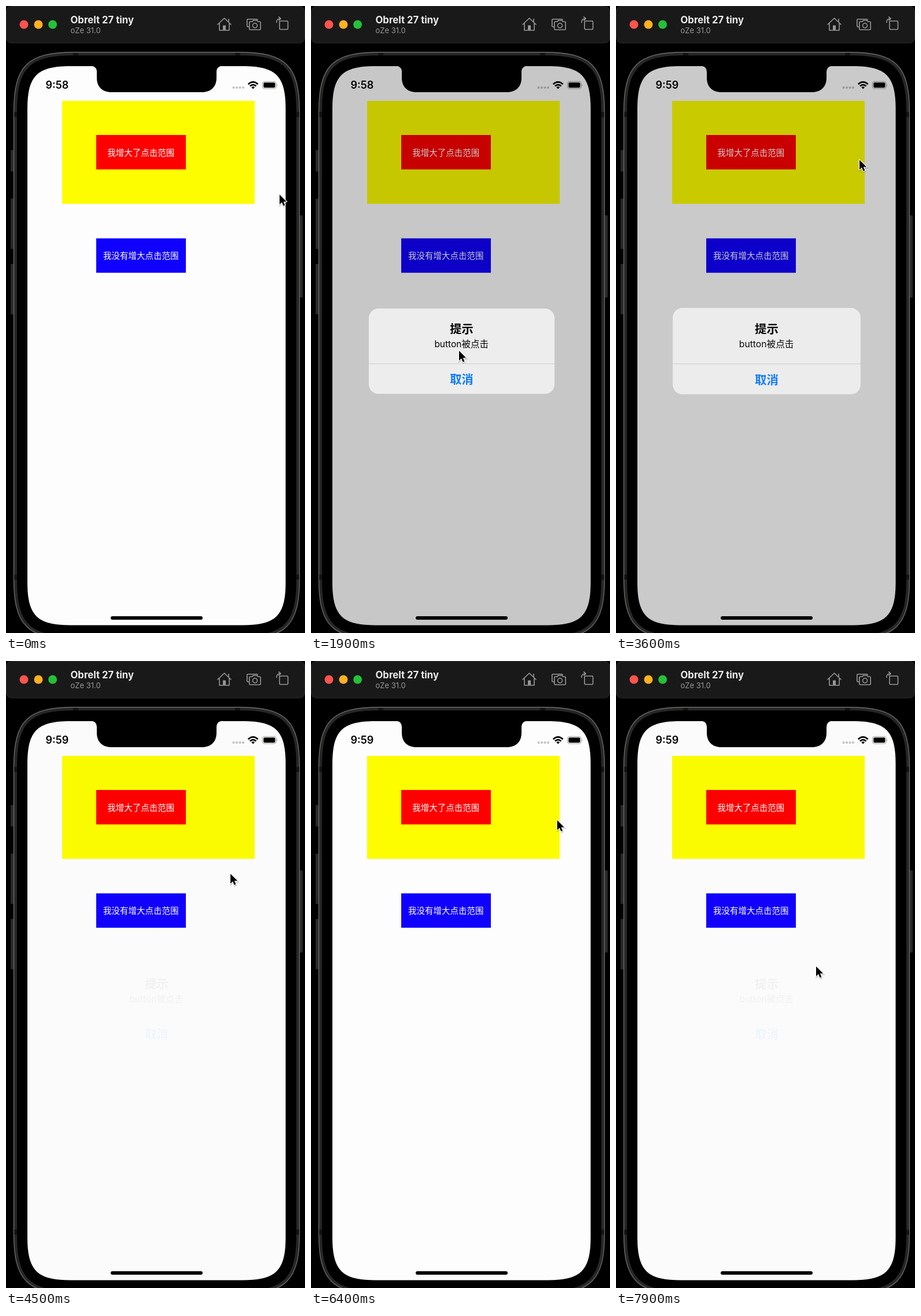
An HTML page for the animation above (8 s loop, 517x1084 px).

```html
<!DOCTYPE html>
<html lang="zh">
<head>
<meta charset="utf-8">
<style>
  html, body { margin: 0; width: 100%; height: 100%; overflow: hidden; background: #000; }
  svg { display: block; width: 517px; height: 1084px; }
  text { font-family: Inter, "Noto Sans CJK SC", "Noto Sans CJK", sans-serif; }
  .mid { text-anchor: middle; }
  .label { font-size: 14.5px; font-weight: 300; fill: #fff; }
  .icon { fill: none; stroke: #989898; stroke-width: 1.6; stroke-linejoin: round; stroke-linecap: round; }
</style>
</head>
<body>
<svg viewBox="0 0 517 1084">
  <rect width="517" height="1084"/>

  <!-- toolbar -->
  <rect x=".5" y=".5" width="516" height="63.5" rx="9" fill="#191919" stroke="#2b2b25"/>
  <circle cx="31" cy="32" r="7.5" fill="#ff544d"/>
  <circle cx="56" cy="32" r="7.5" fill="#ffb122"/>
  <circle cx="80.6" cy="32" r="7.5" fill="#25c138"/>
  <text x="111.5" y="29.5" font-size="16.7" font-weight="700" fill="#ececec">Obrelt 27 tiny</text>
  <text x="111.5" y="47" font-size="13" fill="#9a9a9a">oZe 31.0</text>
  <g class="icon">
    <path d="M366 32 L377.500 21 L389 32 M369 30 V42 H386 V30 M385 27 V22.500"/>
    <rect x="375" y="33.500" width="5" height="8" fill="#989898" stroke="none"/>
    <path d="M420 36 H418.500 Q416.800 36 416.800 34.300 V24.500 Q416.800 22.800 418.500 22.800 H433.500 Q435 22.800 435 24"/>
    <path d="M422.500 27 H426 L427.500 25 H434 L435.500 27 H438.500 Q440.200 27 440.200 28.700 V39.300 Q440.200 41 438.500 41 H422.500 Q420.800 41 420.800 39.300 V28.700 Q420.800 27 422.500 27 Z"/>
    <circle cx="430.500" cy="33.800" r="4"/>
    <rect x="473" y="26" width="14.500" height="14.500" rx="1.500"/>
    <path d="M467.800 28.500 Q467.800 21.800 474.500 21.800 M471.800 18.800 L475 21.800 L471.800 24.800"/>
  </g>

  <!-- phone body -->
  <g fill="#292929">
    <rect x="8" y="249" width="6" height="37" rx="1"/>
    <rect x="8" y="333" width="6" height="87" rx="1"/>
    <rect x="8" y="446" width="6" height="87" rx="1"/>
    <rect x="507" y="362" width="6" height="142" rx="1"/>
  </g>
  <path id="shell" fill="#272727" stroke="#6e6e68" stroke-width="1.3"/>
  <g fill="#141414">
    <rect x="116" y="81" width="9" height="5"/>
    <rect x="396" y="81" width="9" height="5"/>
    <rect x="14" y="183" width="5" height="9"/>
    <rect x="502" y="183" width="5" height="9"/>
    <rect x="14" y="983" width="5" height="9"/>
    <rect x="502" y="983" width="5" height="9"/>
  </g>
  <path id="bezel"/>
  <path id="screen" fill="#fdfdfd"/>

  <!-- status bar -->
  <text id="clock" x="68.500" y="143" font-size="18" font-weight="600"></text>
  <g fill="#c3c3bb">
    <circle cx="393.500" cy="141" r="2.100"/><circle cx="399" cy="141" r="2.100"/>
    <circle cx="404.500" cy="141" r="2.100"/><circle cx="410" cy="141" r="2.100"/>
  </g>
  <g fill="none" stroke="#000" stroke-width="2.800">
    <path d="M418.800 135.300 Q427.200 127.400 435.600 135.300"/>
    <path d="M421.900 138.600 Q427.200 133.600 432.500 138.600"/>
  </g>
  <path d="M424.300 140.500 Q427.200 138 430.100 140.500 L427.200 143.500 Z"/>
  <rect x="443.500" y="130.500" width="23.500" height="12.500" rx="3.600" fill="none" stroke="#a5a59c" stroke-width="1.200"/>
  <rect x="445.300" y="132.300" width="20" height="9" rx="2"/>
  <path d="M468.300 134.700 Q470.300 136.700 468.300 138.900 Z" fill="#a5a59c"/>

  <!-- app -->
  <rect x="97" y="164" width="333" height="178" fill="#fdfd00"/>
  <rect x="156" y="223" width="155" height="59.500" fill="#fe0000"/>
  <rect x="156" y="401.700" width="155" height="59.500" fill="#1000fe"/>
  <text class="mid label" x="233.300" y="258.500">我增大了点击范围</text>
  <text class="mid label" x="233.300" y="437">我没有增大点击范围</text>
  <path id="dim"/>
  <path d="M146 102 V103.500 Q157 104 157 114 V124 C157 140 167 149 182 149 H339 C354 149 364 140 364 124 V114 Q364 104 375 103.500 V102 Z"/>

  <g id="alert">
    <rect x="100" y="523" width="321" height="147.500" rx="16.500" fill="#f1f1f1" fill-opacity=".94"/>
    <path d="M100 618.500 H421" stroke="#cdcdd6"/>
    <g class="mid">
      <text x="260.500" y="566" font-size="20.200" font-weight="700">提示</text>
      <text x="260.200" y="590" font-size="15.500">button被点击</text>
      <text x="260.500" y="653" font-size="20.200" font-weight="700" fill="#0a7aff">取消</text>
    </g>
  </g>
  <rect x="181" y="1055" width="159" height="6" rx="3"/>

  <g id="cursor">
    <path d="M0 0 V17 L4 13.200 L6.600 19.400 L9.400 18.200 L6.800 12.200 H12.200 Z" transform="translate(.6 1.600)" fill="#000" opacity=".18" stroke="#000" stroke-width="2.400"/>
    <path d="M0 0 V17 L4 13.200 L6.600 19.400 L9.400 18.200 L6.800 12.200 H12.200 Z" stroke="#fff" stroke-width="2.200" paint-order="stroke" stroke-linejoin="round"/>
  </g>
</svg>
<script>
const LOOP = 8000, STEP = 100;
const $ = id => document.getElementById(id);

// Rounded rectangle with continuous-curvature corners.
function squircle(left, top, right, bottom, r) {
  const a = 1.4 * r, b = 0.315 * r;
  return `M${left} ${top + a} C${left} ${top + b} ${left + b} ${top} ${left + a} ${top}
    H${right - a} C${right - b} ${top} ${right} ${top + b} ${right} ${top + a}
    V${bottom - a} C${right} ${bottom - b} ${right - b} ${bottom} ${right - a} ${bottom}
    H${left + a} C${left + b} ${bottom} ${left} ${bottom - b} ${left} ${bottom - a} Z`;
}
const display = squircle(37, 104, 483.5, 1070.5, 53);
$('shell').setAttribute('d', squircle(13.5, 80, 507.5, 1094, 74));
$('bezel').setAttribute('d', squircle(19, 85.5, 502, 1089, 69));
$('screen').setAttribute('d', display);
$('dim').setAttribute('d', display);

// Pointer stops: time, x, y
const stops = [
  [0, 473, 326], [200, 473, 326], [900, 410, 290], [1400, 410, 290],
  [1900, 256, 596], [2000, 256, 640], [2100, 256, 640], [2500, 396, 276],
  [3200, 421, 266], [3600, 421, 266], [4000, 258, 640], [4150, 258, 640],
  [4700, 444, 251], [5400, 444, 251], [5600, 438, 262], [5800, 438, 262],
  [6500, 425, 276], [7000, 425, 276], [7350, 258, 642], [7550, 258, 642],
  [7900, 346, 528]
];
// Alert cycles: time shown, time dismissed
const alerts = [[1350, 2100], [3350, 4100], [6750, 7500]];

const clamp = v => Math.min(1, Math.max(0, v));
const smooth = v => v * v * (3 - 2 * v);

function pointerAt(t) {
  const i = stops.findIndex(s => s[0] > t);
  if (i < 0) return stops.at(-1).slice(1);
  const [t0, x0, y0] = stops[i - 1], [t1, x1, y1] = stops[i];
  const k = smooth((t - t0) / (t1 - t0));
  return [x0 + (x1 - x0) * k, y0 + (y1 - y0) * k];
}

function alertAt(t) {
  const cycle = alerts.find(([show, hide]) => t >= show && t < hide + 450);
  if (!cycle) return { opacity: 0, scale: 1 };
  const rest = Math.exp(-0.0113 * (t - cycle[0]));
  const fade = 1 - smooth(clamp((t - cycle[1]) / 450));
  return { opacity: (1 - rest) * fade, scale: 1 + 0.2 * rest };
}

function render(t) {
  const { opacity, scale } = alertAt(t);
  $('dim').setAttribute('opacity', 0.215 * opacity);
  $('alert').setAttribute('opacity', opacity);
  $('alert').setAttribute('transform',
    `translate(260.5 597) scale(${scale}) translate(-260.5 -597)`);
  $('cursor').setAttribute('transform', `translate(${pointerAt(t)})`);
  $('clock').textContent = t < 3000 ? '9:58' : '9:59';
}

const start = performance.now();
function tick() {
  const t = (performance.now() - start) % LOOP;
  render(Math.floor(t / STEP) * STEP);
  requestAnimationFrame(tick);
}
tick();
</script>
</body>
</html>
```
